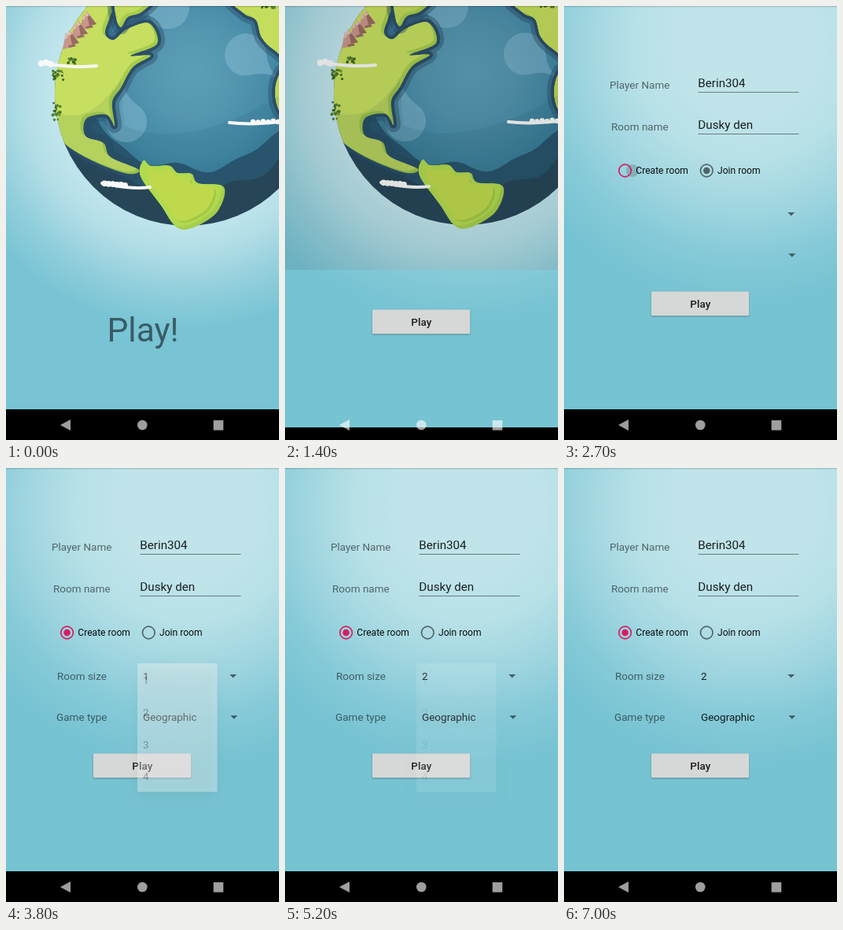
An HTML page with a canvas that plays this animation: 347 px wide and 551 px high, repeating every 8000 ms.

```html
<!DOCTYPE html>
<html lang="en">
<head>
<meta charset="utf-8">
<title>Room setup</title>
<style>
html, body { margin: 0; width: 100%; height: 100%; overflow: hidden; background: #000; }
canvas { display: block; width: 347px; height: 551px; }
</style>
</head>
<body>
<canvas id="stage"></canvas>
<script>
const W = 347, H = 551, NAV = 512, LOOP = 8000, STEP = 100;
const SLIDE = 1400, CREATE = 2700;
const canvas = document.getElementById('stage');
const ctx = canvas.getContext('2d');
const ratio = window.devicePixelRatio || 1;
canvas.width = W * ratio;
canvas.height = H * ratio;

const FONT = 'Roboto, "Noto Sans", sans-serif';
const PINK = '#d81b60', GREY = 'rgba(0,0,0,.54)', INK = 'rgba(0,0,0,.87)';
const GLOW = 'rgba(135,190,211,.5)';
const EARTH = { x: 230, y: 111, r: 168 };

const progress = (t, start, length) => Math.min(1, Math.max(0, (t - start) / length));
const easeOut = p => 1 - (1 - p) ** 2;
const easeInOut = p => (1 - Math.cos(Math.PI * p)) / 2;

// Smooth closed outline through a few key points
function curve(...pts) {
  const at = i => pts[(i + pts.length) % pts.length];
  const path = new Path2D();
  path.moveTo(...pts[0]);
  pts.forEach((b, i) => {
    const a = at(i - 1), c = at(i + 1), d = at(i + 2);
    path.bezierCurveTo(b[0] + (c[0] - a[0]) / 6, b[1] + (c[1] - a[1]) / 6,
      c[0] - (d[0] - b[0]) / 6, c[1] - (d[1] - b[1]) / 6, c[0], c[1]);
  });
  return path;
}

const mainland = curve([100, -9], [138, -9], [132, 14], [126, 35], [137, 43], [153, 30], [182, 22],
  [192, 48], [158, 63], [184, 63], [161, 78], [146, 104], [135, 122], [138, 152], [128, 138],
  [102, 143], [101, 165], [124, 174], [133, 192], [169, 208], [150, 212], [92, 187], [62, 156], [40, 80]);
const island = curve([142, -9], [140, 14], [146, 27], [155, 14], [172, 8], [186, -9]);
const south = curve([171, 216], [175, 196], [184, 203], [208, 203], [218, 212], [236, 213], [244, 225],
  [277, 230], [268, 262], [236, 282], [216, 280], [197, 253]);
const east = curve([289, -9], [303, 10], [318, 18], [325, 40], [341, 56], [365, 66], [365, -9]);
const eastLow = new Path2D();
eastLow.ellipse(360, 110, 18, 32, 0, 0, 7);
const sweep = new Path2D('M50 128C85 150 115 140 146 92L150 152C210 178 290 152 360 106V300H50Z');

// Disc with a rippled rim
function rippled(x, y, r, phase) {
  const path = new Path2D();
  for (let a = 0; a < 6.28; a += .03) {
    const d = r + 4 * Math.sin(9 * a + phase) + 3 * Math.sin(14 * a);
    path.lineTo(x + d * Math.cos(a), y + d * Math.sin(a));
  }
  return path;
}

function fill(path, color) { ctx.fillStyle = color; ctx.fill(path); }

function rect(x, y, w, h, color) { ctx.fillStyle = color; ctx.fillRect(x, y, w, h); }

function disc(x, y, r, color) {
  ctx.fillStyle = color;
  ctx.beginPath();
  ctx.arc(x, y, r, 0, 7);
  ctx.fill();
}

function poly(color, ...pts) {
  ctx.fillStyle = color;
  ctx.beginPath();
  for (let i = 0; i < pts.length; i += 2) ctx.lineTo(pts[i], pts[i + 1]);
  ctx.fill();
}

function text(str, x, y, size, color, weight = 400, align = 'left') {
  ctx.font = `${weight} ${size}px ${FONT}`;
  ctx.textAlign = align;
  ctx.fillStyle = color;
  ctx.fillText(str, x, y);
}

function layer(draw) { ctx.save(); draw(); ctx.restore(); }

function clipRect(x, y, w, h) { ctx.beginPath(); ctx.rect(x, y, w, h); ctx.clip(); }

function radial(x, y, r0, r1, ...colors) {
  const g = ctx.createRadialGradient(x, y, r0, x, y, r1);
  colors.forEach((c, i) => g.addColorStop(i / (colors.length - 1), c));
  return g;
}

function card(x, y, w, h, color, shade, blur, drop) {
  layer(() => {
    ctx.shadowColor = `rgba(0,0,0,${shade})`;
    ctx.shadowBlur = blur * ratio;
    ctx.shadowOffsetY = drop * ratio;
    ctx.fillStyle = color;
    ctx.beginPath();
    ctx.roundRect(x, y, w, h, 1.5);
    ctx.fill();
  });
}

function land(path, core) {
  ctx.lineJoin = 'round';
  ctx.strokeStyle = 'rgba(38,72,98,.4)';
  ctx.lineWidth = 18;
  ctx.stroke(path);
  ctx.strokeStyle = '#2c4f69';
  ctx.lineWidth = 8;
  ctx.stroke(path);
  fill(path, '#a6cd4b');
  layer(() => {
    ctx.clip(path);
    ctx.translate(-4, -3);
    fill(path, core);
  });
}

function teardrop(x, y, r, tip, angle) {
  layer(() => {
    ctx.translate(x, y);
    ctx.rotate(angle);
    ctx.fillStyle = GLOW;
    ctx.beginPath();
    ctx.arc(0, 0, r, 0, Math.PI);
    ctx.bezierCurveTo(-r, -r * .8, -r * .2, -r * .7, 0, -tip);
    ctx.bezierCurveTo(r * .2, -r * .7, r, -r * .8, r, 0);
    ctx.fill();
  });
}

// Thin streak with puffs along part of its length
function cloud(x, y, len, drop, from, to, size) {
  ctx.strokeStyle = '#f7f8f7';
  ctx.lineWidth = 4;
  ctx.lineCap = 'round';
  ctx.beginPath();
  ctx.moveTo(x + 2, y);
  ctx.bezierCurveTo(x + len * .3, y + 3, x + len * .6, y + drop + 3, x + len - 2, y + drop);
  ctx.stroke();
  for (let s = from; s <= to; s += .08) {
    disc(x + len * s, y + drop * s + Math.sin(s * 40), size, '#f7f8f7');
  }
}

function bush(cx, cy, w, h, count) {
  let seed = cx * 31 + cy;
  const rnd = () => (seed = (seed * 16807 + 11) % 2147483647) / 2147483647;
  for (let i = 0; i < count; i++) {
    disc(cx + (rnd() - .5) * w, cy + (rnd() - .5) * h, 1 + rnd(), i % 3 ? '#55802c' : '#3c6324');
  }
}

function peak(x, y) {
  poly('#c9968a', x, y, x + 13, y + 17, x - 4, y + 21);
  poly('#976b60', x, y, x + 13, y + 17, x + 4, y + 19);
  poly('#e3c0b0', x, y, x + 4, y + 6, x - 1, y + 8);
}

function earth() {
  const { x, y, r } = EARTH;
  layer(() => {
    ctx.beginPath();
    ctx.arc(x, y, r, 0, 7);
    ctx.clip();
    rect(0, -70, W, 360, '#294659');
    fill(rippled(x, 72, 168, 0), '#2b5670');
    fill(rippled(x + 6, 52, 155, 2), radial(236, 85, 0, 170, '#5c9fb8', '#5496b0', '#4287a4', '#34728e'));
    teardrop(206, 2, 27, 48, -1.3);
    teardrop(305, 62, 27, 50, 2.2);
    teardrop(153, 147, 26, 50, -.1);
    land(mainland, '#c6df60');
    land(island, '#c0da5a');
    land(east, '#c4dd5c');
    land(eastLow, '#bad755');
    fill(sweep, 'rgba(16,64,80,.09)');
  });
  fill(south, '#a6cd4b');
  layer(() => {
    ctx.clip(south);
    ctx.translate(-4, -4);
    fill(south, '#b2da4f');
  });
  for (const [shift, color] of [[1, '#a2c945'], [-1.5, '#bfd94d']]) {
    layer(() => {
      ctx.translate(223 + shift, 240 + shift);
      ctx.scale(.78, .78);
      ctx.translate(-223, -240);
      fill(south, color);
    });
  }
  for (let i = 0; i < 6; i++) peak(76 + 11 * (i % 3) + 4 * (i > 2), 34 - 12 * (i % 3) - 4 * (i > 2));
  bush(84, 70, 10, 9, 13);
  bush(66, 87, 14, 15, 22);
  bush(65, 134, 11, 22, 24);
  bush(333, 0, 18, 5, 12);
  cloud(41, 72, 76, 4, .05, .25, 4);
  cloud(282, 148, 80, -2, .4, .95, 3.2);
  cloud(120, 225, 65, 5, .08, .5, 3.8);
}

function welcome(t) {
  rect(0, -20, W, NAV + 20, radial(224, 108, 150, 303, '#c6e7ee', '#b3dee7', '#93cfdc', '#78c4d4'));
  earth();
  const pressed = t >= 900 && t < 1200;
  text('Play!', 174, 426.3, 42.5, pressed ? 'rgba(0,0,0,.36)' : 'rgba(0,0,0,.53)', 400, 'center');
}

function radio(x, label, color, dot) {
  ctx.strokeStyle = color;
  ctx.lineWidth = 1.7;
  ctx.beginPath();
  ctx.arc(x, 209, 7.8, 0, 7);
  ctx.stroke();
  if (dot) disc(x, 209, 4.3 * dot, color);
  text(label, x + 13.7, 213, 12.1, 'rgba(0,0,0,.95)');
}

function field(label, x, value, y) {
  text(label, x, y + 5, 13.5, GREY);
  layer(() => {
    clipRect(165, y - 8, 140, 22);
    text(value, 170.3, y + 2.6, 15.2, INK);
  });
  rect(170.5, y + 8.8, 128, 1, 'rgba(0,0,0,.45)');
}

function spinner(label, x, value, y, arrowX, ready) {
  poly(GREY, arrowX - 4.5, y - 2, arrowX + 4.5, y - 2, arrowX, y + 2.5);
  if (!ready) return;
  text(label, x, y + 5, 13.5, GREY);
  text(value, 174, y + 5, 13.5, INK);
}

function popup(top, items, shown, press) {
  if (!shown) return;
  const row = 40.8, h = row * items.length;
  layer(() => {
    ctx.globalAlpha = shown;
    card(167, top, 101.5, h, '#fafafa', .36 * shown, 13, 5);
    clipRect(167, top, 101.5, h);
    if (press) press();
    items.forEach((item, i) => text(item, 174, top + 26 + row * i, 13.5, INK));
  });
}

// Visibility of a popup that fades in, stays, then fades out
const shownAt = (t, open, rise, close, fall) => t < open ? 0 :
  easeOut(progress(t + STEP, open, rise)) * (1 - easeOut(progress(t, close, fall)));

function form(t) {
  rect(0, 0, W, NAV, radial(232, 52, 85, 325, '#c0e4ea', '#b7e0e7', '#a0d6e0', '#86cad8', '#76c3d2'));
  field('Player Name', 58, 'Berin304', 100.2);
  field('Room name', 60, 'Dusky den', 153.2);

  const create = t >= CREATE;
  const ripple = progress(t, CREATE, 500);
  if (create && ripple < 1) {
    disc(87 - 9 * easeOut(ripple), 209, 8 + 9 * easeOut(ripple), `rgba(0,0,0,${.16 * (1 - ripple)})`);
  }
  const picked = easeOut(progress(t, CREATE, 300));
  radio(77.6, 'Create room', create ? PINK : GREY, picked);
  radio(181.3, 'Join room', create ? GREY : PINK, 1 - picked);

  if (create) {
    const ready = t > CREATE;
    spinner('Room size', 65, t < 5100 ? '1' : '2', 264, 288.7, ready);
    spinner('Game type', 64, 'Geographic', 316.3, 289.8, ready);
  }
  card(111, 362.5, 124.2, 30.7, '#d6d7d7', .32, 2, 1);
  text('Play', 173.3, 383, 13.5, INK, 500, 'center');

  popup(248, ['1', '2', '3', '4'], shownAt(t, 3800, 500, 5000, 300),
    t >= 5000 && (() => rect(167, 289, 102, 41, 'rgba(0,0,0,.1)')));
  popup(300, ['Geographic'], shownAt(t, 5800, 400, 6800, 200),
    t >= 6700 && (() => disc(218, 288, 31, 'rgba(0,0,0,.1)')));
}

function navigation() {
  const color = 'rgba(255,255,255,.62)';
  poly(color, 69, 532, 82, 525, 82, 539);
  disc(173.3, 532, 6.3, color);
  rect(263.7, 526, 12.6, 12.6, color);
}

function draw(t) {
  ctx.setTransform(ratio, 0, 0, ratio, 0, 0);
  rect(0, 0, W, H, '#000');
  const step = (t - SLIDE) / STEP;
  const top = Math.max(0, 335 - 286 * step);
  if (top > 0) {
    layer(() => {
      clipRect(0, 0, W, NAV);
      if (step >= 0) ctx.translate(0, -1 - 6 * step);
      welcome(t);
    });
  }
  if (step >= 0) {
    rect(0, 0, W, top, 'rgba(0,0,0,.09)');
    layer(() => {
      clipRect(0, top, W, H - top);
      ctx.translate(0, Math.round(23 * (1 - easeInOut(progress(t, SLIDE, 300)))));
      form(t);
    });
  }
  rect(0, 0, W, 1.3, 'rgba(0,0,0,.16)');
  navigation();
}

function tick() {
  const t = performance.now() % LOOP;
  draw(Math.floor(t / STEP) * STEP);
  requestAnimationFrame(tick);
}
tick();
</script>
</body>
</html>
```
